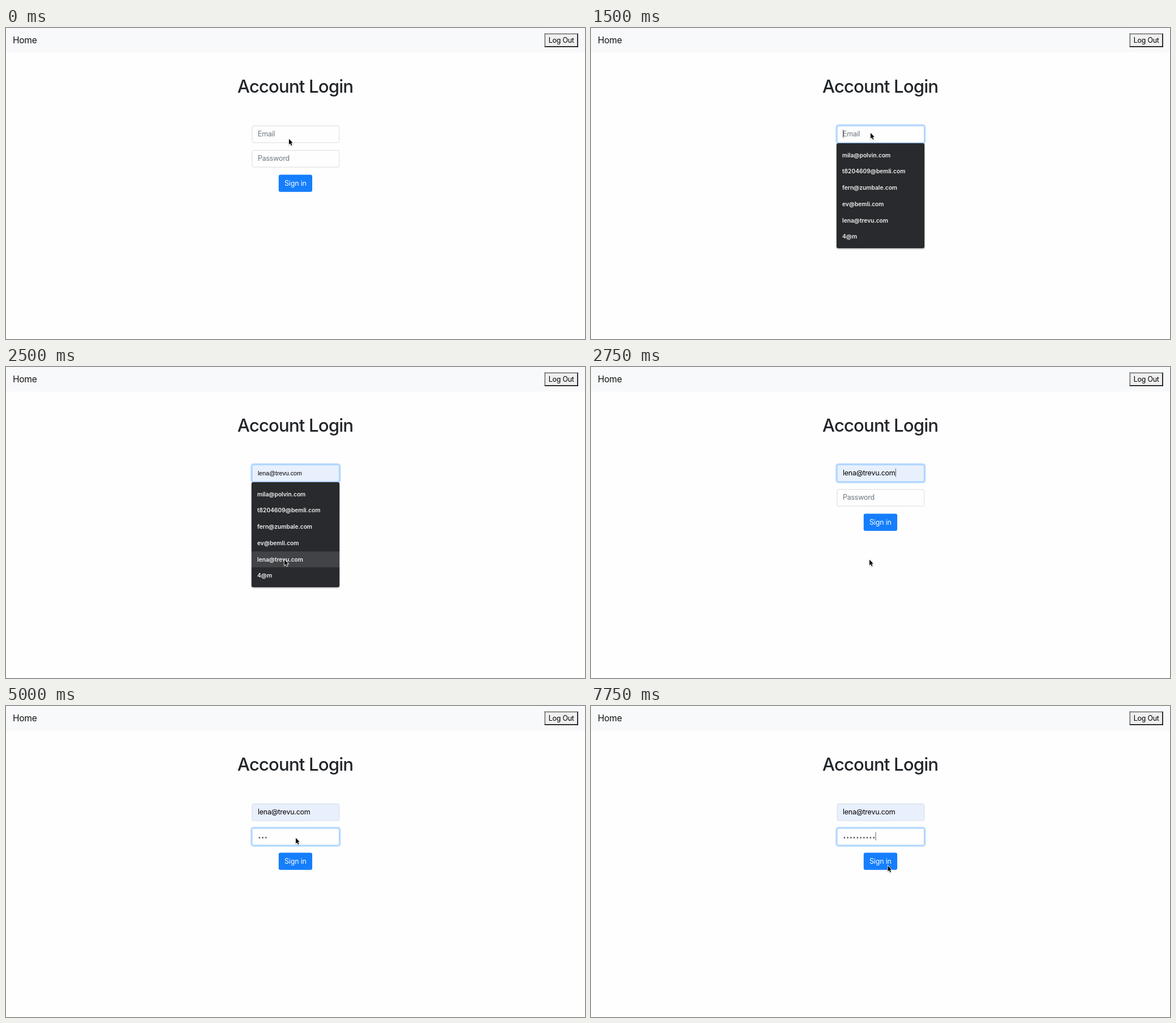
An HTML page that plays this animation: 1021 px wide and 548 px high, repeating every 8 s.

```html
<!DOCTYPE html>
<html lang="en">
<head>
<meta charset="utf-8">
<title>Account Login</title>
<style>
  html, body { margin: 0; width: 100%; height: 100%; overflow: hidden; }
  body { position: relative; background: #fefefe; color: #212529; font: 15.6px Inter, sans-serif; letter-spacing: -.3px; }
  body * { position: absolute; box-sizing: border-box; white-space: nowrap; }
  /* The page is shown at 80 % zoom; menu and cursor lie above it. */
  #page { left: 0; top: 0; width: 1276px; height: 685px; transform: scale(.8); transform-origin: 0 0; }
  nav { left: 0; top: 0; width: 1277px; height: 54px; background: #f8f9fa; color: #111; line-height: 54px; }
  nav b { left: 15px; font-weight: 400; font-size: 19.4px; }
  nav i { left: 1187px; top: 12px; width: 74px; height: 30px; border: 2px solid; border-color: #707070 #000 #000 #707070;
    background: #efefef; color: #000; font-style: normal; line-height: 26px; text-align: center; }
  h1 { left: 0; top: 104px; width: 1275px; margin: 0; font-size: 38.8px; font-weight: 500; line-height: 48px; letter-spacing: -1px; text-align: center; }
  .field { left: 542px; width: 193px; height: 38px; border: 1px solid #ced4da; border-radius: 4px; background: #fefefe;
    padding-left: 12px; line-height: 36.5px; }
  .field * { position: static; }
  .field.focus { border-color: #80bdff; box-shadow: 0 0 0 3px #bfdeff; }
  .field.filled { background: #e8f0fe; }
  .text { color: #6c757d; }
  .filled .text { color: #000; }
  .preview .text { font: 13.33px "Liberation Sans", Arial, sans-serif; letter-spacing: 0; }
  .dots { display: inline-block; height: 8px; vertical-align: -.5px;
    background: radial-gradient(circle, #495057 1.4px, transparent 2.1px) 0 0 / 7.19px 8px; }
  .caret { display: inline-block; width: 1px; height: 18px; margin-right: -1px; vertical-align: -3px; background: #333; }
  #email { top: 215px; }
  #password { top: 269px; }
  #submit { left: 601px; top: 323px; width: 74px; height: 38px; border-radius: 4px; background: #157efd; color: #fff;
    line-height: 38px; text-align: center; letter-spacing: -.2px; }
  #menu { left: 433px; top: 203px; width: 155px; height: 185px; border-radius: 3px; background: #292a2d; color: #f1f1f2;
    box-shadow: 0 1px 3px #0006; font-size: 10.2px; font-weight: 600; letter-spacing: 0; }
  #menu div { left: 0; width: 155px; height: 28.75px; padding-left: 10px; line-height: 28.75px; }
  #menu .hover { background: #424346; }
  #cursor { left: 0; top: 0; overflow: visible; filter: drop-shadow(0 1px 1px #0003); }
</style>
</head>
<body>
<div id="page">
  <nav><b>Home</b><i>Log Out</i></nav>
  <h1>Account Login</h1>
  <div id="email"></div>
  <div id="password"></div>
  <div id="submit">Sign in</div>
</div>
<div id="menu"></div>
<svg id="cursor" width="9" height="14">
  <path d="M0 0V9.9L2.3 7.8 3.9 11.6 5.5 10.9 3.9 7.1H6.8Z" stroke="#fff" stroke-width="1.6" paint-order="stroke"/>
</svg>
<script>
const DURATION = 8000;
const ACCOUNTS = ['mila@polvin.com', 't8204609@bemli.com', 'fern@zumbale.com', 'ev@bemli.com', 'lena@trevu.com', '4@m'];
const CHOSEN = ACCOUNTS[4];
const [email, password, menu, cursor] = ['email', 'password', 'menu', 'cursor'].map(id => document.getElementById(id));

// Each step holds from its time on and changes only the listed properties.
const steps = [
  [0, { x: 499, y: 195.5, focus: '', caret: false, menu: false, hover: -1, value: '', dots: 0 }],
  [500, { x: 498.5, y: 192 }],
  [750, { x: 498, y: 190 }],
  [1250, { x: 493, y: 185, focus: 'email', caret: true }],
  [1500, { menu: true }],
  [1750, { x: 498, y: 248, hover: 1, caret: false }],
  [2000, { x: 503, y: 286, hover: 2 }],
  [2250, { x: 500, y: 316, hover: 3 }],
  [2500, { x: 491, y: 339.5, hover: 4 }],
  [2750, { menu: false, hover: -1, value: CHOSEN, caret: true }],
  [3000, { x: 492, y: 332 }],
  [3250, { x: 500, y: 290, caret: false }],
  [3500, { x: 508, y: 248 }],
  [3750, { x: 511, y: 232.5, focus: 'password', caret: true }],
  [4000, { dots: 1 }],
  [4250, { dots: 2 }],
  [4500, { dots: 3 }],
  [5000, { caret: false }],
  [5250, { dots: 4, caret: true }],
  [5500, { dots: 6 }],
  [5750, { dots: 7 }],
  [6250, { caret: false }],
  [6500, { dots: 9, caret: true }],
  [6750, { dots: 10 }],
  [7250, { caret: false }],
  [7500, { x: 518, y: 260 }],
  [7750, { x: 523.5, y: 281.5, caret: true }],
];

menu.innerHTML = ACCOUNTS.map((name, i) => `<div style="top:${6.5 + 28.75 * i}px">${name}</div>`).join('');

const textSpan = text => `<span class="text">${text}</span>`;

function drawField(field, content, placeholder, state, classes = '') {
  const focused = state.focus === field.id;
  const caret = focused && state.caret ? '<span class="caret"></span>' : '';
  field.className = `field ${focused ? 'focus' : ''} ${classes}`;
  field.innerHTML = content + caret + (content ? '' : textSpan(placeholder));
}

function draw(state) {
  const preview = ACCOUNTS[state.hover];
  const value = preview || state.value;
  drawField(email, value && textSpan(value), 'Email', state, (value ? 'filled ' : '') + (preview ? 'preview' : ''));
  const dots = state.dots ? `<span class="dots" style="width:${7.19 * state.dots}px"></span>` : '';
  drawField(password, dots, 'Password', state);
  menu.hidden = !state.menu;
  [...menu.children].forEach((row, i) => row.classList.toggle('hover', i === state.hover));
  cursor.style.transform = `translate(${state.x}px, ${state.y}px)`;
}

let shown = -1;
function tick() {
  const time = performance.now() % DURATION;
  const active = steps.filter(([start]) => start <= time);
  if (active.length !== shown) {
    shown = active.length;
    draw(Object.assign({}, ...active.map(([, change]) => change)));
  }
  requestAnimationFrame(tick);
}
tick();
</script>
</body>
</html>
```
